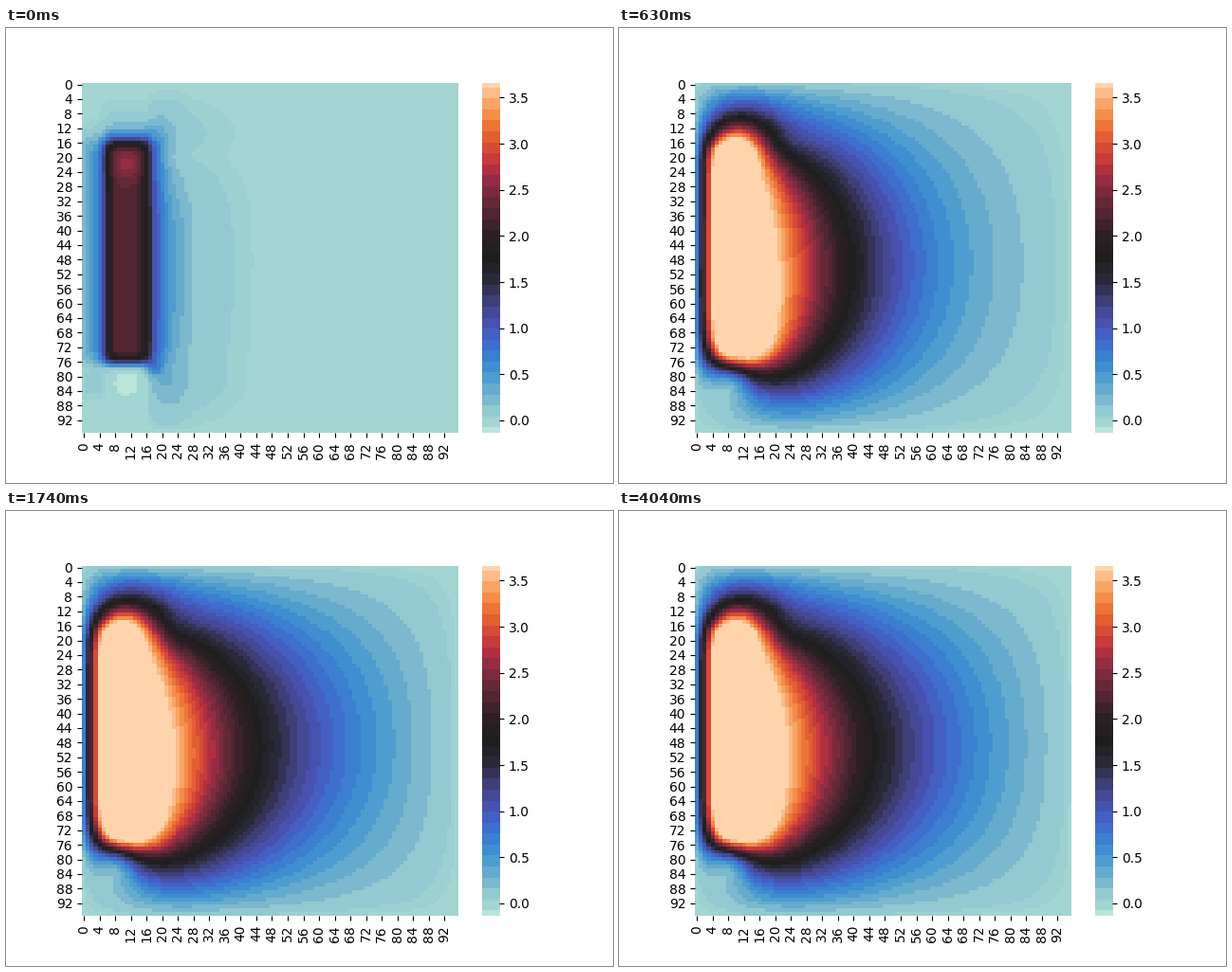
Recreate the animation shown at these times as a matplotlib script. Size 640 by 480 pixels, loop 8 s.

```python
import numpy as np
import matplotlib.pyplot as plt
from matplotlib.animation import FuncAnimation
from matplotlib.colors import LinearSegmentedColormap

N = 96
LOOP_MS, INTERVAL, STEP_MS = 8000, 32, 30
VMIN, VMAX = -0.136, 3.663
DIFFUSION = 41.4  # cells squared per step

plt.rcParams["font.family"] = "DejaVu Sans"

# Ice-to-fire colours, as (value, colour)
STOPS = [
    (VMIN, "#bde7db"), (0.0, "#a3d5d2"), (0.1, "#93c9d0"), (0.25, "#76b4ce"),
    (0.41, "#55a3cd"), (0.6, "#3b8bd0"), (0.8, "#3d70d0"), (1.0, "#4856bb"),
    (1.2, "#45478f"), (1.35, "#3a3965"), (1.5, "#2b2a3b"), (1.76, "#1f1e1e"),
    (2.0, "#2c2025"), (2.2, "#4a2530"), (2.4, "#6b2a39"), (2.6, "#952d43"),
    (2.75, "#b8313f"), (2.9, "#d04338"), (3.05, "#e25a33"), (3.2, "#ee7639"),
    (3.35, "#f6954f"), (3.5, "#f9b27c"), (VMAX, "#ffd4ac"),
]


def to_index(value):
    return (value - VMIN) / (VMAX - VMIN) * 256


cmap = LinearSegmentedColormap.from_list(
    "icefire_bands", [(to_index(v) / 256, c) for v, c in STOPS], N=1024)
edges = np.concatenate([[4, 10.5, 12.5], np.arange(20, 256, 8)])
centres = np.concatenate([[1, 9, 12], np.arange(16, 256, 8), [256]])
band_rgb = (cmap(centres / 256)[:, :3] * 255).round().astype(np.uint8)


def colour(index):
    return band_rgb[np.digitize(index, edges)]


rows, cols = np.mgrid[0:N, 0:N].astype(float)


def blob(row, col, sigma):
    return np.exp(-((rows - row) ** 2 + (cols - col) ** 2) / (2 * sigma ** 2))


def charge(total, row, col, sigma):
    return total * blob(row, col, sigma) / (2 * np.pi * sigma ** 2)


def source_field():
    rod = (rows >= 17) & (rows <= 75) & (cols >= 4) & (cols <= 9)
    return (0.145 * rod
            + charge(8, 18, 10, 3) + charge(8, 72, 13, 3)
            - charge(3, 17, 22, 3.5) - charge(6, 81, 9, 2.5))


def start_field():
    across = np.interp(
        cols,
        [-1, 0, 2, 3, 4, 5, 6, 7, 8, 10, 13, 14, 15, 16, 17, 18, 19,
         21, 23, 26, 28, 33, 38, 43, 52],
        [0, .25, .4, .55, .8, 1.2, 1.7, 2.0, 2.2, 2.27, 2.25, 2.15, 2.0, 1.85,
         1.5, 1.1, .9, .6, .42, .24, .16, .1, .052, .02, 0])
    sharp = np.interp(
        rows,
        [2, 9, 12, 13, 14, 15, 16, 17, 19, 73, 74, 75, 76, 77, 78, 80],
        [0, .03, .1, .2, .32, .5, .72, .86, 1, 1, .93, .82, .6, .27, .06, 0])
    wide = np.interp(
        rows,
        [0, 5, 9, 13, 17, 20, 26, 36, 48, 62, 70, 75, 82, 88, 91, 96],
        [0, .15, .32, .42, .36, .28, .55, .93, 1, .95, .85, .7, .75, .4, .25, 0])
    mix = np.clip((cols - 16) / 8, 0, 1)
    return (across * (sharp * (1 - mix) + wide * mix)
            + 0.32 * blob(22, 11, 3) + 0.45 * blob(78, 18, 1.5)
            + 0.15 * blob(13, 18, 2.5) + 0.08 * blob(82, 3, 3)
            - 0.14 * blob(82, 10.5, 3))


# Sine modes keep the field at zero just outside the grid
k = np.arange(1, N + 1)
sine = np.sin(np.pi * np.outer(k, k) / (N + 1)) * np.sqrt(2 / (N + 1))
lam = 2 - 2 * np.cos(np.pi * k / (N + 1))
rate = lam[:, None] + lam[None, :]
steady = sine @ source_field() @ sine / rate
offset = sine @ start_field() @ sine - steady


def field(step):
    return sine @ (steady + offset * np.exp(-rate * DIFFUSION * step)) @ sine


fig = plt.figure(figsize=(6.4, 4.8), dpi=100, facecolor="white")


def panel(left, width):
    ax = fig.add_axes([left / 640, 0.11, width / 640, 0.77])
    for spine in ax.spines.values():
        spine.set_visible(False)
    return ax


ax = panel(80, 396.8)
heat = ax.imshow(colour(to_index(field(0))), aspect="auto",
                 interpolation="nearest", extent=(0, N, N, 0))
marks = np.arange(0, N, 4)
ax.set_xticks(marks + 0.5, marks, rotation=90)
ax.set_yticks(marks + 0.5, marks)

bar = panel(501.6, 18.48)
bar.imshow(colour(np.arange(512) / 2 + 0.25)[:, None], aspect="auto",
           interpolation="nearest", origin="lower", extent=(0, 1, VMIN, VMAX))
levels = np.arange(0, 4, 0.5)
bar.set_xticks([])
bar.yaxis.tick_right()
bar.set_yticks(levels, [f"{v:.1f}" for v in levels])


def update(i):
    heat.set_data(colour(to_index(field(i * INTERVAL / STEP_MS))))
    return [heat]


anim = FuncAnimation(fig, update, frames=LOOP_MS // INTERVAL,
                     interval=INTERVAL, repeat=True, repeat_delay=0)
plt.show()
```
